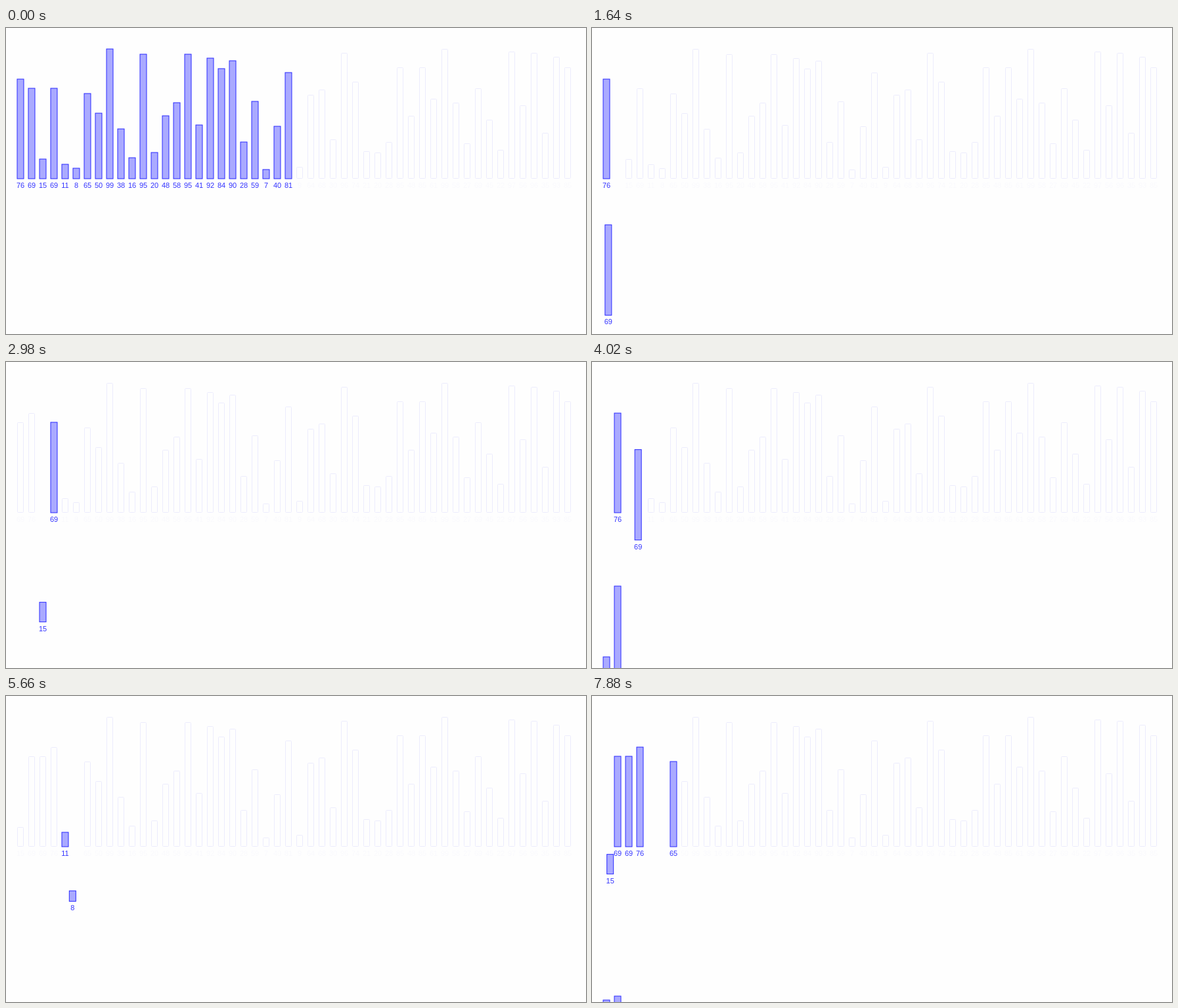
Recreate the animation shown at these times as an HTML page with a canvas. Size 883 by 467 pixels, loop 8 s.

```html
<!DOCTYPE html>
<html lang="en">
<head>
<meta charset="utf-8">
<title>Merge sort</title>
<style>
html, body { margin: 0; width: 100%; height: 100%; overflow: hidden; background: #fefefe; }
canvas { display: block; }
</style>
</head>
<body>
<canvas id="stage" width="883" height="467"></canvas>
<script>
const ctx = document.getElementById('stage').getContext('2d');

const VALUES = [
  76, 69, 15, 69, 11, 8, 65, 50, 99, 38, 16, 95, 20, 48, 58, 95, 41, 92, 84, 90, 28, 59, 7, 40, 81,
  9, 64, 68, 30, 96, 74, 21, 20, 28, 85, 48, 85, 61, 99, 58, 27, 69, 45, 22, 97, 56, 96, 35, 93, 85
];
const LOOP = 8000;
const TICK = 148.7;    // redraw interval
const PHASE = 226.5;   // length of one sorting phase
const LEAD = 322;      // phase time already elapsed at loop start
const STEP = 29, STEPS = 6;
const LEFT = 16, PITCH = 17, BASE = 230, DROP = 250;

// Each phase holds the active range and where every bar rests or travels.
const phases = [];
const bars = VALUES.map((v, i) => ({ v, slot: i, row: 0 }));

function record(lo, hi, move) {
  const before = bars.map(b => ({ ...b }));
  if (move) move();
  phases.push(before.map((b, i) => ({
    v: b.v,
    active: b.slot >= lo && b.slot <= hi,
    from: b,
    to: { slot: bars[i].slot, row: bars[i].row }
  })));
}

function merge(lo, mid, hi) {
  const take = (a, b) => bars.filter(x => x.slot >= a && x.slot <= b).sort((x, y) => x.slot - y.slot);
  const left = take(lo, mid), right = take(mid + 1, hi);
  const range = left.concat(right);
  const record2 = move => {
    record(-1, -1, move);
    const last = phases[phases.length - 1];
    range.forEach(b => { last[bars.indexOf(b)].active = true; });
  };
  for (let k = lo; k <= hi; k++) {
    const fromLeft = left.length && (!right.length || left[0].v <= right[0].v);
    const bar = (fromLeft ? left : right).shift();
    record2(() => { bar.slot = k; bar.row = 1; });
  }
  record2(() => range.forEach(b => { b.row = 0; }));
}

function sort(lo, hi) {
  record(lo, hi);
  if (lo === hi) return;
  const mid = (lo + hi) >> 1;
  sort(lo, mid);
  sort(mid + 1, hi);
  merge(lo, mid, hi);
}

function drawFaint(v, x) {
  ctx.strokeStyle = '#ececfd';
  ctx.beginPath();
  ctx.roundRect(x + 1.5, BASE - 2 * v + 0.5, 9, 2 * v - 1, 1);
  ctx.stroke();
  ctx.fillStyle = '#f9f9fd';
  ctx.fillText(v, x + 6, BASE + 14);
}

function drawActive(v, x, y) {
  const top = BASE + y - 2 * v;
  ctx.fillStyle = '#aaaaff';
  ctx.fillRect(x + 1, top, 10, 2 * v);
  ctx.strokeStyle = '#2a2aff';
  ctx.strokeRect(x + 1, top, 10, 2 * v);
  ctx.fillStyle = '#3333ff';
  ctx.fillText(v, x + 6, BASE + y + 14);
}

function draw(ms) {
  const t = Math.floor((ms + 8) / TICK) * TICK + 3 + LEAD;
  const n = Math.floor(t / PHASE);
  const p = Math.min(STEPS, Math.floor((t - n * PHASE) / STEP)) / STEPS;

  ctx.fillStyle = '#fefefe';
  ctx.fillRect(0, 0, 883, 467);
  ctx.lineWidth = 1;
  ctx.font = '11px "Liberation Sans", Arial, sans-serif';
  ctx.textAlign = 'center';

  for (const { v, active, from, to } of phases[n]) {
    const x = LEFT + PITCH * (from.slot + (to.slot - from.slot) * p);
    const y = DROP * (from.row + (to.row - from.row) * p);
    if (active) drawActive(v, x, y);
    else drawFaint(v, x);
  }
}

function frame() {
  draw(performance.now() % LOOP);
  requestAnimationFrame(frame);
}

sort(0, VALUES.length - 1);
frame();
</script>
</body>
</html>
```
